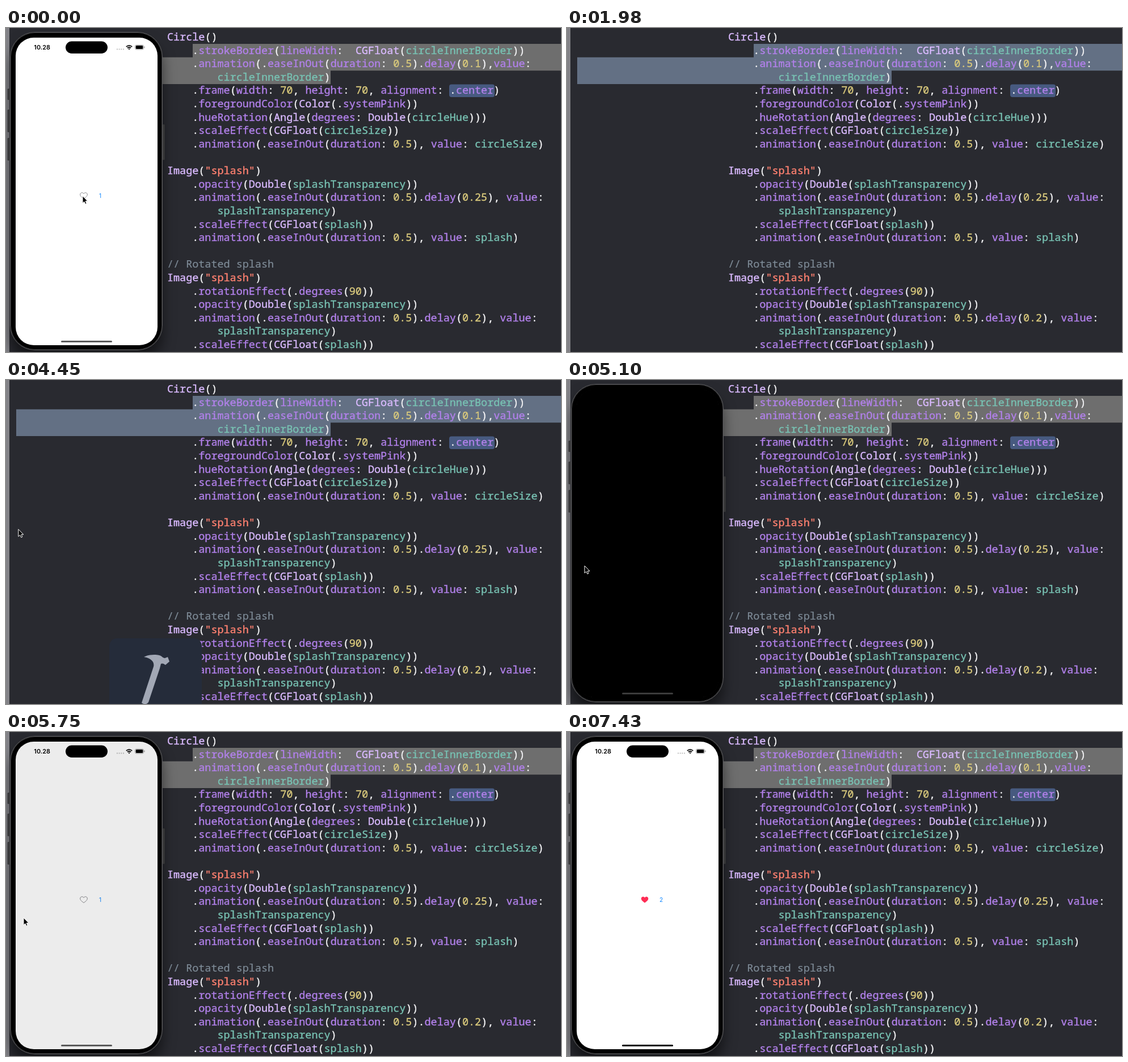
An HTML page that plays this animation: 978x572 px, repeating every 8000 ms.

```html
<!DOCTYPE html>
<html lang="en">
<head>
<meta charset="utf-8">
<title>Heart reaction</title>
<style>
  html, body { margin: 0; width: 100%; height: 100%; overflow: hidden; background: #292a30; }
  #stage { position: relative; width: 978px; height: 572px; overflow: hidden; background: #292a30; }
  #strip { position: absolute; left: 0; top: 0; width: 6px; height: 572px; background: #838388; }
  svg { position: absolute; left: 0; top: 0; }
  pre {
    position: absolute; left: 284px; top: 3px; margin: 0; color: #f4f4f6;
    font: 500 18.44px/23.61px "Noto Sans Mono", "DejaVu Sans Mono", monospace;
    font-variant-ligatures: none; -webkit-text-stroke: .4px;
  }
  .type { color: #dabaff; }
  .call { color: #b281eb; }
  .state { color: #78c2b3; }
  .num { color: #d9c97c; }
  .str { color: #ff8170; }
  .note { color: #7f8c98; -webkit-text-stroke: .2px; }
  #body {
    position: absolute; left: 7px; top: 7px; width: 267px; height: 560px;
    border: 1.5px solid #5e5e60; border-radius: 44px; background: #000;
    box-shadow: inset 0 0 0 1px #2a2a2c, 0 18px 22px rgba(0, 0, 0, .5);
  }
</style>
</head>
<body>
<div id="stage">
  <div id="strip"></div>
  <svg width="978" height="572">
    <path id="selection" d="M329 28H978V75.2H572V99H18V51.8H329Z"/>
    <rect x="781" y="99.5" width="80" height="22.5" rx="4" fill="#475a80"/>
  </svg>
  <pre id="code"></pre>

  <svg id="bezel" width="978" height="572">
    <rect x="182" y="456" width="163" height="163" rx="14" fill="#252c3a"/>
    <path fill="#a2a8b5" d="M243 489C250 485 262 484 270 486C275 487 276 491 280 491L285 489L288 497L281 503C277 500 275 500 273 501L271 509L251 569Q246 575 239 570L260 506C262 498 256 491 243 489Z"/>
  </svg>

  <div id="phone">
    <svg width="300" height="572" fill="#48484a">
      <rect x="2.5" y="107" width="5" height="20" rx="1.5"/>
      <rect x="2.5" y="144" width="5" height="40" rx="1.5"/>
      <rect x="2.5" y="194" width="5" height="40" rx="1.5"/>
      <rect x="276" y="170" width="3.5" height="63" rx="1.5"/>
    </svg>
    <div id="body"></div>
    <svg width="300" height="572">
      <rect x="17" y="17" width="250" height="543" rx="32" fill="#fff"/>
      <text x="63.6" y="38" text-anchor="middle" font-family="Inter, sans-serif" font-size="10.8" font-weight="600">10.28</text>
      <path d="M195 37.5h13" stroke="#bbb" stroke-width="1.8" stroke-dasharray="1.8 1.9"/>
      <g fill="none" stroke="#000" stroke-width="1.8">
        <path d="M211.8 33.2Q217 28.6 222.2 33.2M213.9 35.3Q217 32.6 220.1 35.3"/>
        <path d="M217 38.2l-1.2-1.5q1.2-.9 2.4 0Z" fill="#000" stroke-width=".6"/>
      </g>
      <rect x="227.5" y="30" width="15" height="8" rx="2.4" fill="#fff" stroke="#888" stroke-width=".8"/>
      <rect x="228.7" y="31.1" width="12.6" height="5.8" rx="1.5"/>
      <path d="M244 32.7v2.6" stroke="#888"/>

      <g transform="translate(137 296)">
        <path id="outline" class="heart" fill="none" stroke="#858589"/>
        <circle id="ring" fill="none"/>
        <g id="splash"></g>
        <path id="heart" class="heart" fill="#ff2d55"/>
      </g>
      <text id="count" x="166" y="299.5" text-anchor="middle" font-family="Inter, sans-serif" font-size="10" fill="#0a84ff"></text>

      <rect id="shade" x="16.5" y="16.5" width="251" height="544" rx="32"/>
      <rect x="105" y="23.5" width="74" height="21.5" rx="10.75"/>
      <rect id="home" x="97" y="552" width="90" height="3" rx="1.5"/>
    </svg>
  </div>

  <svg width="978" height="572">
    <path id="cursor" d="M0 0V12.8L2.9 10.2L4.9 14.4L7 13.5L5.1 9.3H9Z" stroke="#fff" stroke-linejoin="round"/>
  </svg>
</div>

<script>
const LOOP = 8000;
const HEART = 'M0 5.5C-2 4-6.3 1.2-6.3-1.8C-6.3-5.8-1.5-6.4 0-3.4C1.5-6.4 6.3-5.8 6.3-1.8C6.3 1.2 2 4 0 5.5Z';
const SOURCE = `Circle()
    .strokeBorder(lineWidth:  CGFloat(circleInnerBorder))
    .animation(.easeInOut(duration: 0.5).delay(0.1),value:
        circleInnerBorder)
    .frame(width: 70, height: 70, alignment: .center)
    .foregroundColor(Color(.systemPink))
    .hueRotation(Angle(degrees: Double(circleHue)))
    .scaleEffect(CGFloat(circleSize))
    .animation(.easeInOut(duration: 0.5), value: circleSize)

Image("splash")
    .opacity(Double(splashTransparency))
    .animation(.easeInOut(duration: 0.5).delay(0.25), value:
        splashTransparency)
    .scaleEffect(CGFloat(splash))
    .animation(.easeInOut(duration: 0.5), value: splash)

// Rotated splash
Image("splash")
    .rotationEffect(.degrees(90))
    .opacity(Double(splashTransparency))
    .animation(.easeInOut(duration: 0.5).delay(0.2), value:
        splashTransparency)
    .scaleEffect(CGFloat(splash))`;

const $ = id => document.getElementById(id);
const clamp = u => Math.max(0, Math.min(1, u));
const lerp = (a, b, u) => a + (b - a) * u;
const span = (t, from, to) => clamp((t - from) / (to - from));
const easeInOut = u => u < .5 ? 2 * u * u : 1 - 2 * (1 - u) ** 2;
const easeOut = u => 1 - (1 - u) ** 3;
const set = (id, attributes) => {
  for (const name in attributes) $(id).setAttribute(name, attributes[name]);
};

const tokenClass = token =>
  token.startsWith('//') ? 'note' :
  token[0] === '"' ? 'str' :
  /^\d/.test(token) ? 'num' :
  /^[A-Z]/.test(token) ? 'type' :
  /^(circle|splash)/.test(token) ? 'state' : 'call';
$('code').innerHTML = SOURCE.replace(/\/\/.*|"\w+"|[\d.]*\d|[A-Za-z]\w*/g,
  token => `<span class="${tokenClass(token)}">${token}</span>`);

document.querySelectorAll('.heart').forEach(path => path.setAttribute('d', HEART));

// Two rings of dots, the second turned by a quarter.
const dots = Array.from({ length: 7 }, (_, i) => {
  const angle = i * 2 * Math.PI / 7 - .64, radius = i % 2 ? 27 : 30;
  return `<circle cx="${radius * Math.cos(angle)}" cy="${radius * Math.sin(angle)}"
    r="${i % 2 ? 1.3 : 1.9}" fill="hsl(${i * 97 % 360} 75% 68%)"/>`;
}).join('');
$('splash').innerHTML = `<g>${dots}</g><g transform="rotate(90)">${dots}</g>`;

function cursorAt(t) {
  const move = (a, b, u) => [lerp(a[0], b[0], u), lerp(a[1], b[1], u)];
  const rest = [31, 328], onHeart = [135, 296.5];
  if (t < 900) return move(onHeart, [-10, -18], easeInOut(span(t, 450, 880)));
  if (t < 4390) return null;
  if (t < 4640) return move([15, 240], [24, 271], span(t, 4360, 4480));
  if (t < 6000) return move([24, 271], rest, easeOut(span(t, 4610, 4960)));
  if (t < 6680) return move(rest, onHeart, easeOut(span(t, 5970, 6480)));
  return t < 7400 ? move(onHeart, [44, 199], span(t, 7130, 7380) ** 2) : null;
}

function drawReaction(elapsed) {
  const liked = elapsed >= 0;
  const progress = delay => easeInOut(span(elapsed, delay, delay + 500));
  const size = 1.3 * progress(0);
  const border = 20.4 * (1 - progress(100));
  set('ring', {
    r: (20.4 - border / 2) * size,
    'stroke-width': border * size,
    stroke: `hsl(${lerp(185, 285, progress(0))} 85% 62%)`
  });
  set('splash', { transform: `scale(${progress(0)})` });
  const [straight, turned] = $('splash').children;
  straight.setAttribute('opacity', liked ? 1 - progress(250) : 0);
  turned.setAttribute('opacity', liked ? 1 - progress(200) : 0);

  const grow = span(elapsed, 100, 600);
  const bounce = 1 - Math.exp(-6 * grow) * Math.cos(8 * grow) * (1 - grow);
  set('heart', { transform: `scale(${bounce})` });
  set('outline', { opacity: 1 - span(elapsed, 0, 150) });
  $('count').textContent = liked ? 2 : 1;
}

function draw(t) {
  const building = t >= 1980 && t < 4850;
  $('phone').style.display = building ? 'none' : '';
  $('bezel').style.display = t >= 2110 && t < 4700 ? '' : 'none';
  set('selection', { fill: building ? '#637084' : '#6e6e6e' });

  drawReaction(t < 1980 ? t - 30 : t - 6670);

  const lit = t < 1980 ? 1 : 1 - (1 - span(t, 5570, 5810)) ** 1.85;
  set('shade', { opacity: 1 - lit });
  const fade = t < 1980 ? span(t, 820, 1060) : span(t, 7190, 7430);
  const grey = lerp(60, 92, lit) * (1 - fade);
  set('home', { fill: `rgb(${grey} ${grey} ${grey})` });

  const tip = cursorAt(t);
  $('cursor').style.display = tip ? '' : 'none';
  if (tip) set('cursor', { transform: `translate(${tip})` });
}

function tick() {
  draw(performance.now() % LOOP);
  requestAnimationFrame(tick);
}
tick();
</script>
</body>
</html>
```
